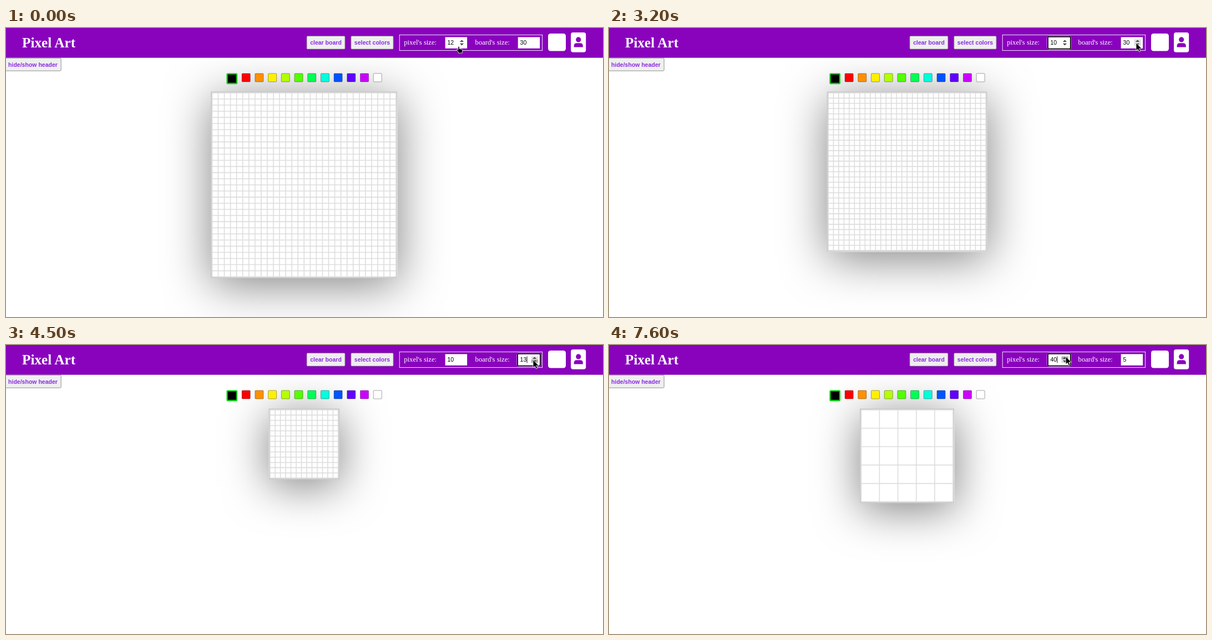
An HTML page that plays this animation: 1076 by 521 pixels, repeating every 8 s.

```html
<!DOCTYPE html>
<html lang="en">
<head>
<meta charset="utf-8">
<title>Pixel Art</title>
<style>
  html, body { margin: 0; width: 100%; height: 100%; overflow: hidden; background: #fff; }
  #shadow { position: absolute; top: 114.5px; box-shadow: .8px 11.85px 79px rgba(0, 0, 0, .5); }
  svg { position: absolute; left: 0; top: 0; }
  .serif { font-family: "Liberation Serif", "Times New Roman", serif; fill: #fff; }
  .sans { font: 10.53px "Liberation Sans", Arial, sans-serif; }
  .button text { font-weight: bold; fill: #8a2be2; text-anchor: middle; }
  .button rect { fill: #efefef; stroke: #767676; stroke-width: .8; }
</style>
</head>
<body>
<div id="shadow"></div>
<svg width="1076" height="521" viewBox="0 0 1076 521">
  <g id="board">
    <rect id="frame" fill="#fff" stroke="#ccc" stroke-width="2.37"/>
    <path id="grid" fill="none" stroke="#ddd" stroke-width="1.58"/>
  </g>
  <g id="palette"></g>
  <rect width="1076" height="53.7" fill="#8903bd"/>
  <text class="serif" x="29" y="35" font-size="25.28" font-weight="bold">Pixel Art</text>
  <g id="buttons"></g>
  <rect x="709.2" y="12.4" width="257.4" height="28.2" fill="none" stroke="#fff" stroke-width=".9"/>
  <text class="serif" x="717.3" y="30" font-size="12.64">pixel's size:</text>
  <text class="serif" x="845.6" y="30" font-size="12.64">board's size:</text>
  <g id="fields"></g>
  <rect x="977" y="10" width="32" height="31.5" rx="4.5" fill="#fff"/>
  <rect x="1018" y="8" width="27.2" height="35.8" rx="4" fill="#fff"/>
  <g fill="#8903bd">
    <circle cx="1031.7" cy="20.9" r="4.6"/>
    <path d="M1023.6 34.6V32.4Q1023.6 27.3 1028.7 27.3H1034.7Q1039.8 27.3 1039.8 32.4V34.6Z"/>
  </g>
  <g stroke="#fff" stroke-width=".8" stroke-linejoin="round">
    <path id="arrow" d="M0 0V14.2L3.2 11.2L5.5 16.2L7.9 15.1L5.7 10.2H10.1Z"/>
    <path id="hand" d="M-1.2 .8Q0 -.7 1.2 .8V4.4L5 5.2Q7 5.6 6.9 7.4L6.3 10V12.2H-.7V10.4L-3.8 6.8Q-4 5 -2.4 5.6L-1.2 6.6Z"/>
  </g>
</svg>
<script>
const LOOP = 8000, UNIT = 0.79, CENTER = 537.25, TOP = 114.5;
const EDGE = 3 * UNIT;
const $ = id => document.getElementById(id);

function add(parent, tag, attrs, text = "") {
  const el = document.createElementNS("http://www.w3.org/2000/svg", tag);
  set(el, attrs);
  el.textContent = text;
  return parent.appendChild(el);
}
function set(el, attrs) {
  for (const key in attrs) el.setAttribute(key, attrs[key]);
}
const show = (el, on) => set(el, { visibility: on ? "visible" : "hidden" });

// Each track is a list of [start time, value] held until the next entry.
const pixelSize = [[0, 12], [700, 11], [1200, 10], [5900, 11], [6100, 12], [6300, 15], [6400, 18],
  [6600, 21], [6700, 23], [6800, 26], [7000, 29], [7200, 31], [7300, 34], [7500, 37], [7600, 40]];
const boardSize = [[0, 30], [3400, 29], [3700, 28], [3800, 26], [3900, 24],
  [4300, 20], [4400, 17], [4500, 13], [4600, 10], [4700, 6], [5100, 5]];
const focus = [[0, ""], [700, "pixel"], [3400, "board"], [5900, "pixel"]];
const hover = [[0, ""], [200, "pixel"], [1900, ""], [3200, "board"], [5300, ""], [5500, "pixel"]];
const pressed = [[0, ""], [3400, "down"], [5100, ""], [5900, "up"]];
const caret = [[0, true], [1800, false], [2400, true], [3200, false], [3400, true], [5100, false], [5900, true]];
const pointer = [[0, [816, 33]], [100, [817, 35]], [200, [821.5, 30]], [700, [821.5, 27.8]],
  [1800, [822, 28.3]], [1900, [822.5, 28.6]], [2400, [946, 26.5]], [3200, [950, 26.8]],
  [5200, [942, 26]], [5300, [908, 24]], [5400, [862, 22]], [5500, [830, 20.5]], [5600, [821.8, 20.8]], [5900, [823.2, 20.8]]];

function at(track, time) {
  let value;
  for (const [start, v] of track) if (start <= time) value = v;
  return value;
}

function button(x, y, width, height, label) {
  const g = add($("buttons"), "g", { class: "button" });
  add(g, "rect", { x, y, width, height, rx: 1.6 });
  add(g, "text", { class: "sans", x: x + width / 2, y: y + height / 2 + 3.8 }, label);
}
button(542, 14.4, 69, 23.7, "clear board");
button(621.8, 14.4, 76.3, 23.7, "select colors");
button(-2.2, 54.2, 101.4, 23, "hide/show header");

add($("palette"), "rect", { x: 398.6, y: 82.6, width: 17.4, height: 17.4, rx: .8, stroke: "#00d10a", "stroke-width": 2.3 });
["#f00", "#ff9000", "#fff000", "#b4ff00", "#54ff00", "#00ff54", "#00ffdc", "#0054ff", "#6000ff", "#cc00ff", "#fff"]
  .forEach((fill, i) => add($("palette"), "rect", {
    x: 425.2 + i * 23.7, y: 82, width: 15, height: 15, rx: 1.2,
    fill, stroke: "#000", "stroke-opacity": .45, "stroke-width": .8
  }));

function field(x) {
  const g = add($("fields"), "g", { transform: `translate(${x} 16.4)` });
  const ring = add(g, "g", { fill: "none" });
  add(ring, "rect", { x: -1.6, y: -1.6, width: 42.7, height: 23.6, rx: 2.8, stroke: "#fff", "stroke-width": 1 });
  add(g, "rect", { width: 39.5, height: 20.4, fill: "#fff" });
  add(ring, "rect", { x: -.7, y: -.7, width: 40.9, height: 21.8, rx: 1.8, stroke: "#000", "stroke-width": 1.7 });
  g.appendChild(ring);
  const text = add(g, "text", { class: "sans", x: 3.9, y: 13.8 });
  const bar = add(g, "rect", { y: 4, width: .9, height: 12 });
  const spin = add(g, "g", {});
  const up = add(spin, "rect", { x: 24, y: 4.2, width: 12.4, height: 5.8 });
  const down = add(spin, "rect", { x: 24, y: 10, width: 12.4, height: 5.8 });
  add(spin, "path", { d: "M26.3 8.6L29.9 5L33.5 8.6ZM26.3 11.4H33.5L29.9 15Z", fill: "#484848" });
  return { ring, text, bar, spin, up, down };
}
const fields = { pixel: field(791.6), board: field(922.7) };

function drawField(name, value, time) {
  const f = fields[name];
  const focused = at(focus, time) === name, hovered = at(hover, time) === name;
  const near = name === "pixel" ? time < 1900 || time >= 5500 : time >= 2400 && time < 5300;
  const shade = side => !hovered ? "none" : at(pressed, time) === side ? "#aaa" : "#dedede";
  f.text.textContent = value;
  show(f.ring, focused);
  show(f.bar, focused && at(caret, time));
  set(f.bar, { x: 4.2 + String(value).length * 5.86 });
  show(f.spin, focused || near);
  set(f.up, { fill: shade("up") });
  set(f.down, { fill: shade("down") });
}

function drawBoard(cell, count) {
  const step = (cell + 2) * UNIT, inner = step * count, outer = inner + 2 * EDGE;
  const left = CENTER - outer / 2;
  Object.assign($("shadow").style, { left: left + "px", width: outer + "px", height: outer + "px" });
  set($("board"), { transform: `translate(${left} ${TOP})` });
  set($("frame"), { x: EDGE / 2, y: EDGE / 2, width: outer - EDGE, height: outer - EDGE });
  let d = "";
  for (let i = 0; i <= count; i++) {
    // Outer lines are half as thick, so nudge them under the frame edge.
    const p = EDGE + i * step;
    if (i > 0 && i < count) d += `M${p} ${EDGE}v${inner}M${EDGE} ${p}h${inner}`;
  }
  const a = EDGE + .2, b = inner - .4;
  $("grid").setAttribute("d", d + `M${a} ${a}h${b}v${b}h${-b}Z`);
}

function draw(time) {
  const cell = at(pixelSize, time), count = at(boardSize, time);
  drawBoard(cell, count);
  drawField("pixel", cell, time);
  drawField("board", count, time);
  const [x, y] = at(pointer, time);
  const isHand = time < 200;
  show($("hand"), isHand);
  show($("arrow"), !isHand);
  set(isHand ? $("hand") : $("arrow"), { transform: `translate(${x} ${y})` });
}

const start = performance.now();
function tick() {
  draw((performance.now() - start) % LOOP);
  requestAnimationFrame(tick);
}
tick();
</script>
</body>
</html>
```
